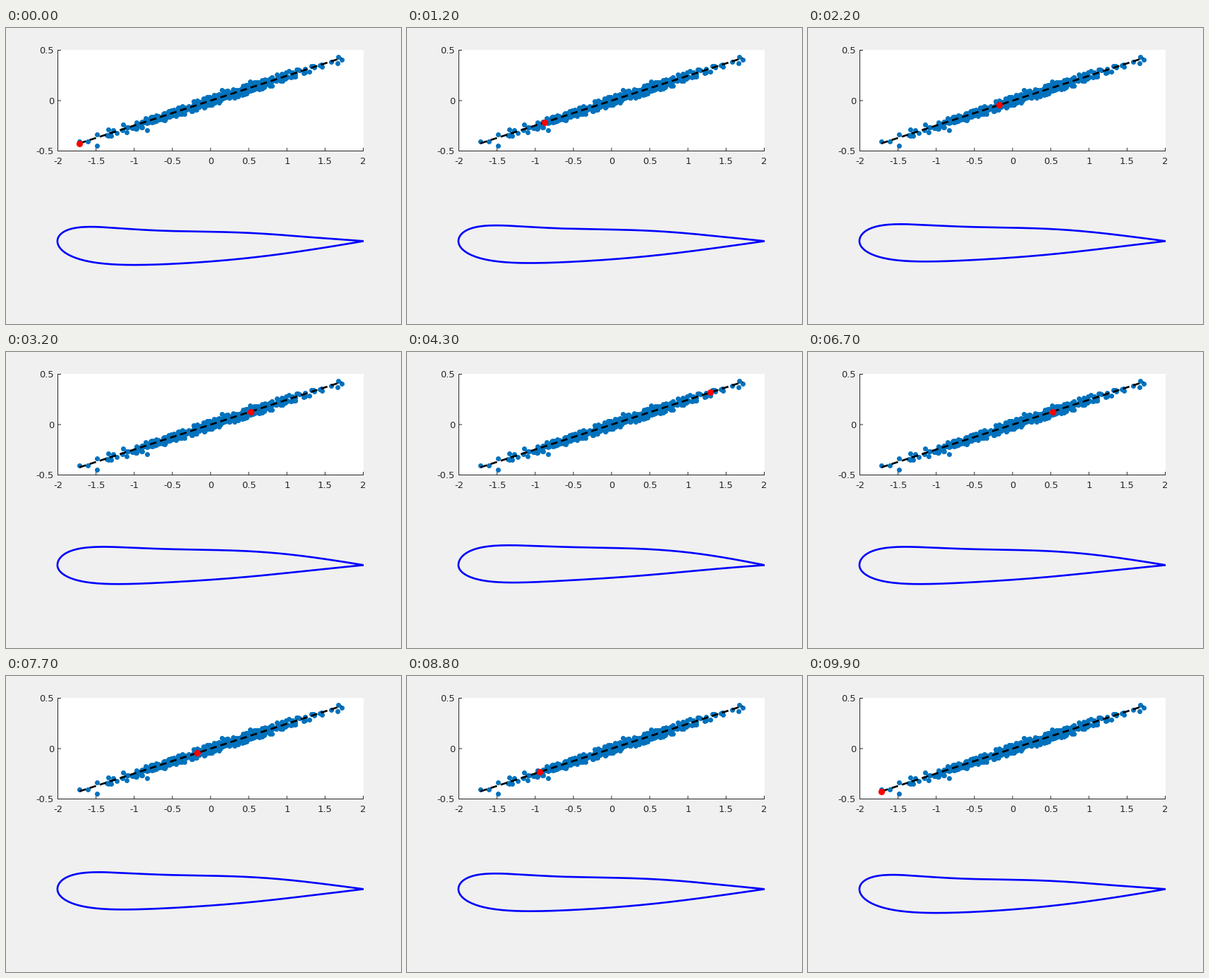
A matplotlib script for the animation above (10000 ms loop, 560 by 420 pixels).

```python
import numpy as np
import matplotlib.pyplot as plt
from matplotlib.animation import FuncAnimation
from matplotlib.patches import Rectangle

W, H = 560, 420
PX = 0.72  # points per pixel at 100 dpi
LINE = 2.67  # thick line width in pixels
STEPS = 50
INK = "#262626"
SLOPE = 0.2465
X_MIN, X_MAX = -1.71, 1.715
FOIL_LEFT, FOIL_MID, CHORD = 72.9, 302.35, 434

plt.rcParams["font.family"] = "DejaVu Sans"
fig = plt.figure(figsize=(W / 100, H / 100), dpi=100, facecolor="#f0f0f0")
ax = fig.add_axes([0, 0, 1, 1])
ax.set_xlim(0, W)
ax.set_ylim(H, 0)
ax.axis("off")


def to_px(x, y):
    return 289.8 + 108.5 * x, 103.15 - 143.4 * y


def rule(xs, ys):
    ax.plot(xs, ys, color=INK, lw=PX, solid_capstyle="butt", snap=False,
            zorder=0.5)


def label(x, y, text, ha):
    ax.text(x, y, text, size=13 * PX, color=INK, ha=ha, va="baseline")


def dots(x, y, size, color, zorder):
    return ax.scatter(x, y, s=(size * PX) ** 2, color=color, lw=0,
                      zorder=zorder)


def draw_axes():
    ax.add_patch(Rectangle((73, 31), 434, 144, color="white", lw=0,
                           snap=False, zorder=0))
    rule([73, 507], [174.5, 174.5])
    rule([73.5, 73.5], [31, 175])
    for v in np.arange(-2, 2.1, 0.5):
        x = 290 + 108.25 * v
        rule([x, x], [170, 175])
        label(x, 193, f"{v:g}", "center")
    for v in (-0.5, 0, 0.5):
        y = 103 - 143 * v
        rule([73, 78], [y, y])
        label(68, y + 4.7, f"{v:g}", "right")


def draw_cloud():
    rng = np.random.default_rng(4)
    x = rng.normal(0, 0.6, 520)
    x = x[(x > -1.45) & (x < 1.62)]
    noise = np.clip(rng.normal(0, 0.022, x.size), -0.045, 0.045)
    dots(*to_px(x, SLOPE * x + noise), 7, "#0072bd", 1)
    outliers = [(-1.71, -0.405), (-1.6, -0.4), (-1.48, -0.335),
                (-1.48, -0.445), (-0.83, -0.295), (0.15, 0.108),
                (0.52, 0.19), (0.8, 0.145), (1.66, 0.37), (1.67, 0.433),
                (1.72, 0.405)]
    dots(*to_px(*np.transpose(outliers)), 7, "#0072bd", 1)

    ends = np.array([X_MIN, X_MAX])
    ax.plot(*to_px(ends, SLOPE * ends), color="black", lw=LINE * PX,
            ls=(0, (9.5 / LINE, 5.5 / LINE)), dash_capstyle="butt", zorder=2)


# Airfoil surface: height = sqrt(u) (1 - u) S(u), S a curve through key points
KEYS = [0, 0.11, 0.29, 0.5, 0.75, 1]
u = (1 - np.cos(np.linspace(0, np.pi, 160))) / 2
foil_x = FOIL_LEFT + CHORD * np.r_[u[::-1], u[1:]]


def surface(*shape):
    return np.sqrt(u) * (1 - u) * np.polyval(np.polyfit(KEYS, shape, 5), u)


def outline(upper, lower):
    return FOIL_MID + np.r_[-upper[::-1], lower[1:]]


low_foil = outline(surface(100, 68.6, 41.2, 37.5, 37.5, 31),
                   surface(108, 100, 88, 81.8, 79.4, 77))
high_foil = outline(surface(115, 92, 69.5, 68.8, 83, 86),
                    surface(95, 79.8, 61, 51, 41.8, 34))
HIGH_STEP = 43  # step at which the outline equals high_foil

draw_axes()
draw_cloud()
foil, = ax.plot([], [], color="blue", lw=LINE * PX, solid_capstyle="butt",
                solid_joinstyle="round", zorder=3)
marker = dots([0], [0], 9.2, "red", 4)


def update(frame):
    step = min(frame, 2 * STEPS - 1 - frame)
    x = X_MIN + (X_MAX - X_MIN) * step / (STEPS - 1)
    marker.set_offsets([to_px(x, SLOPE * x)])
    foil.set_data(foil_x, low_foil + (high_foil - low_foil) * step / HIGH_STEP)
    return marker, foil


anim = FuncAnimation(fig, update, frames=2 * STEPS, interval=100,
                     repeat=True, repeat_delay=0, blit=False)
plt.show()
```
